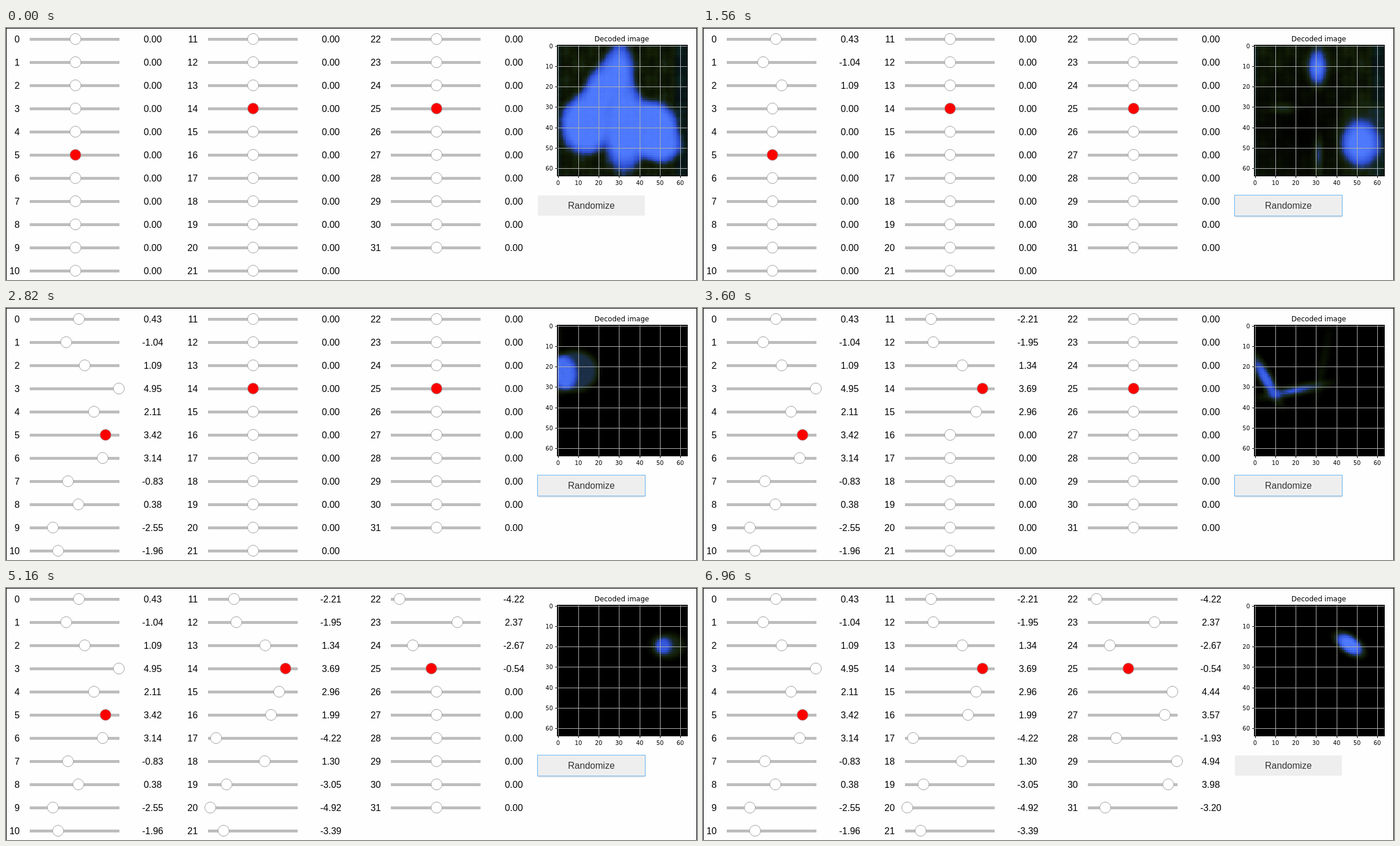
Animation of 1194 by 435 pixels, one loop 7.02 s. Source, as an HTML page with a canvas:

```html
<!DOCTYPE html>
<html lang="en">
<head>
<meta charset="utf-8">
<title>Latent sliders</title>
<style>
html, body { margin: 0; width: 100%; height: 100%; overflow: hidden; background: #fff; }
canvas { display: block; }
</style>
</head>
<body>
<canvas id="stage" width="1194" height="435"></canvas>
<script>
const ctx = document.getElementById('stage').getContext('2d');
const LOOP = 7020;
const TICK = 60;
const N = 64;
const PLOT = { x: 952.5, y: 29.5, size: 225.5 };
const CELL = PLOT.size / N;
const SANS = '16px "Liberation Sans", Arial, sans-serif';
const PLOT_FONT = '"DejaVu Sans", sans-serif';
const TRACKS = [41, 348.7, 665];
const RED = [5, 14, 25];

// The readouts shown beside the sliders.
const VALUES = [
  0.43, -1.04, 1.09, 4.95, 2.11, 3.42, 3.14, -0.83, 0.38, -2.55, -1.96,
  -2.21, -1.95, 1.34, 3.69, 2.96, 1.99, -4.22, 1.30, -3.05, -4.92, -3.39,
  -4.22, 2.37, -2.67, -0.54, 4.44, 3.57, -1.93, 4.94, 3.98, -3.20
];

const clamp = v => Math.max(0, Math.min(1, v));
const smooth = v => v * v * (3 - 2 * v);
const hash = (x, y) => {
  const s = Math.sin(x * 12.9898 + y * 78.233) * 43758.5453;
  return s - Math.floor(s);
};

// Sliders change at a steady pace after the first; the picture lags one change behind.
function changesAt(t) {
  if (t < 1020) return 0;
  let count = 1;
  while (count <= VALUES.length && t >= TICK * Math.floor(24 + 2.6 * (count - 1))) count++;
  return count;
}

// A soft ellipse in cell units: returns its brightness at a point.
const oval = (cx, cy, rx, ry, { level = 1, turn = 0, soft = 2.5 } = {}) => (x, y) => {
  const dx = x - cx, dy = y - cy, c = Math.cos(turn), s = Math.sin(turn);
  const r = Math.hypot((dx * c + dy * s) / rx, (dy * c - dx * s) / ry);
  return level * smooth(clamp(0.5 - (r - 1) * Math.min(rx, ry) / (2 * soft)));
};

function key(at, haze, ...ovals) {
  const field = Float32Array.from({ length: N * N }, (_, i) => {
    const x = i % N + 0.5, y = Math.floor(i / N) + 0.5;
    return 1 - ovals.reduce((dark, brightness) => dark * (1 - brightness(x, y)), 1);
  });
  return { at, haze, field };
}

const wide = { soft: 4 };
const KEYS = [
  key(0, 1, oval(30.5, 14, 6.5, 14, wide), oval(21, 24, 8, 17, { turn: 0.4, soft: 4 }),
    oval(14, 39, 12, 14, wide), oval(33, 40, 10, 21, wide),
    oval(45, 41, 14, 13.5, wide), oval(51, 49, 9, 8, wide)),
  key(2, 0.55, oval(31, 11, 4, 7.5, { soft: 3.5 }), oval(52, 48, 8.5, 10, { soft: 4.5 }),
    oval(54, 46, 13, 18, { level: 0.25, soft: 6 }), oval(14, 31, 5, 2, { level: 0.38 }),
    oval(31.5, 54, 1.5, 6, { level: 0.6 })),
  key(5, 0.2, oval(6, 23, 12, 12), oval(59, 44, 3, 6, { level: 0.4, soft: 4 })),
  key(6, 0, oval(8.5, 22.5, 11.5, 10, { level: 0.95 }), oval(0, 6, 2, 9, { level: 0.2 })),
  key(14, 0, oval(1, 24, 8, 9, { level: 0.9 })),
  key(15, 0, oval(5.5, 26, 11, 2.8, { level: 0.85, turn: 1.05 }),
    oval(20, 32, 11, 1.8, { level: 0.8, turn: -0.2 }),
    oval(33.5, 20, 1.5, 11, { level: 0.2, turn: 0.2 })),
  key(17, 0, oval(32, 22, 6, 7, { level: 0.75 })),
  key(21, 0, oval(50.5, 20.8, 5, 4.5), oval(44.5, 20, 4.5, 2.6, { level: 0.75 })),
  key(23, 0, oval(54, 20, 8, 6)),
  key(26, 0, oval(52, 20, 4, 4, { level: 0.65 })),
  key(29, 0, oval(51.5, 17.5, 3, 2.5, { level: 0.25 })),
  key(32, 0, oval(46.7, 19.3, 7.2, 4, { turn: 0.62 }))
];

// Brightness stops: black, moss, teal, blue, light blue.
const RAMP = [
  [0, 0, 0, 0], [0.28, 20, 32, 7], [0.45, 26, 45, 62], [0.68, 45, 78, 210], [1, 80, 124, 255]
];
function shade(v) {
  const i = Math.max(1, RAMP.findIndex(stop => stop[0] >= v));
  const a = RAMP[i - 1], b = RAMP[i], f = (v - a[0]) / (b[0] - a[0]);
  return [1, 2, 3].map(c => a[c] + (b[c] - a[c]) * f);
}

const decoded = document.createElement('canvas');
decoded.width = decoded.height = N;
const decodedCtx = decoded.getContext('2d');

function decode(index) {
  const next = Math.max(1, KEYS.findIndex(k => k.at >= index));
  const a = KEYS[next - 1], b = KEYS[next], f = (index - a.at) / (b.at - a.at);
  const mix = (u, w) => u + (w - u) * f;
  const haze = mix(a.haze, b.haze);
  const image = decodedCtx.createImageData(N, N);
  for (let i = 0; i < N * N; i++) {
    const x = i % N, y = Math.floor(i / N);
    const weave = 0.8 + 0.12 * Math.cos(x * Math.PI / 2) + 0.08 * Math.cos(y * Math.PI / 2);
    const mottle = 0.85 + 0.25 * Math.sin(x * 0.45) * Math.sin(y * 0.4 + 1);
    const cover = clamp(2.2 * haze - 1.2 + Math.hypot(x - 22, y - 40) / 45);
    const mist = 0.32 * cover * weave * mottle * (0.9 + 0.2 * hash(x, y));
    const v = mix(a.field[i], b.field[i]) * (0.92 + 0.05 * weave + 0.03 * hash(y, x));
    const rim = cover * clamp(1 - 2 * v) * clamp(clamp((x - 56) / 3) + clamp((2 - x) / 2));
    const [red, green, blue] = shade(clamp(mist + v * (1 - mist)));
    image.data.set([red * (1 - 0.5 * rim), green, blue + 24 * rim * weave, 255], i * 4);
  }
  decodedCtx.putImageData(image, 0, 0);
}

function text(str, x, y, font, align = 'center', color = '#000') {
  ctx.font = font;
  ctx.textAlign = align;
  ctx.fillStyle = color;
  ctx.fillText(str, x, y);
}
function rect(x, y, w, h, color) {
  ctx.fillStyle = color;
  ctx.fillRect(x, y, w, h);
}
function frame(x, y, w, h, color) {
  ctx.lineWidth = 1;
  ctx.strokeStyle = color;
  ctx.strokeRect(x, y, w, h);
}

function drawSlider(i, value) {
  const track = TRACKS[Math.floor(i / 11)], y = 19 + 40 * (i % 11);
  text(i, track - 17.3, y + 6, SANS, 'right');
  text(value.toFixed(2), track + 212.5, y + 6, SANS);
  rect(Math.round(track), y - 2, 155, 5, '#bdbdbd');
  ctx.beginPath();
  ctx.arc(Math.round(track + 78.7 + value * 15.2), y, 9.5, 0, Math.PI * 2);
  ctx.fillStyle = RED.includes(i) ? '#f00' : '#fff';
  ctx.fill();
  ctx.lineWidth = 1;
  ctx.strokeStyle = '#9e9e9e';
  ctx.stroke();
}

function drawPlot(index) {
  decode(index);
  text('Decoded image', 1064, 23, '12px ' + PLOT_FONT);
  ctx.imageSmoothingEnabled = false;
  ctx.drawImage(decoded, PLOT.x, PLOT.y, PLOT.size, PLOT.size);
  for (let n = 0; n <= 60; n += 10) {
    const at = (n + 0.5) * CELL;
    const x = Math.floor(PLOT.x + at), y = Math.floor(PLOT.y + at);
    rect(x, 30, 1, 225, '#b0b0b0');
    rect(953, y, 224, 1, '#b0b0b0');
    rect(x, 256, 1, 3, '#000');
    rect(949, y, 3, 1, '#000');
    text(n, x, 271, '10px ' + PLOT_FONT);
    text(n, 945, y + 4, '10px ' + PLOT_FONT, 'right');
  }
  frame(PLOT.x, PLOT.y, 225, 226, '#000');
}

function buttonState(t) {
  if (t < 420 || t >= 6960) return 'rest';
  if (t < 600) return 'hover';
  return t < 720 ? 'press' : 'focus';
}

function drawButton(state) {
  ctx.save();
  if (state !== 'rest') {
    ctx.shadowColor = 'rgba(0,0,0,0.2)';
    ctx.shadowBlur = 3;
    ctx.shadowOffsetY = 2;
  }
  rect(919, 289, 185, 35, state === 'press' ? '#bdbdbd' : '#eee');
  ctx.restore();
  if (state === 'press' || state === 'focus') frame(918.5, 288.5, 186, 36, '#64b5f6');
  text('Randomize', 1011.5, 312, SANS, 'center', '#333');
}

function draw(changes, state) {
  rect(0, 0, 1194, 435, '#fefefe');
  VALUES.forEach((value, i) => drawSlider(i, i < changes ? value : 0));
  drawPlot(Math.max(0, changes - 1));
  drawButton(state);
  frame(0.5, 0.5, 1193, 440, '#000');
}

let start, shown;
function tick(now) {
  start ??= now;
  const t = (now - start) % LOOP;
  const changes = changesAt(t), state = buttonState(t);
  if (shown !== changes + state) {
    draw(changes, state);
    shown = changes + state;
  }
  requestAnimationFrame(tick);
}
requestAnimationFrame(tick);
</script>
</body>
</html>
```
